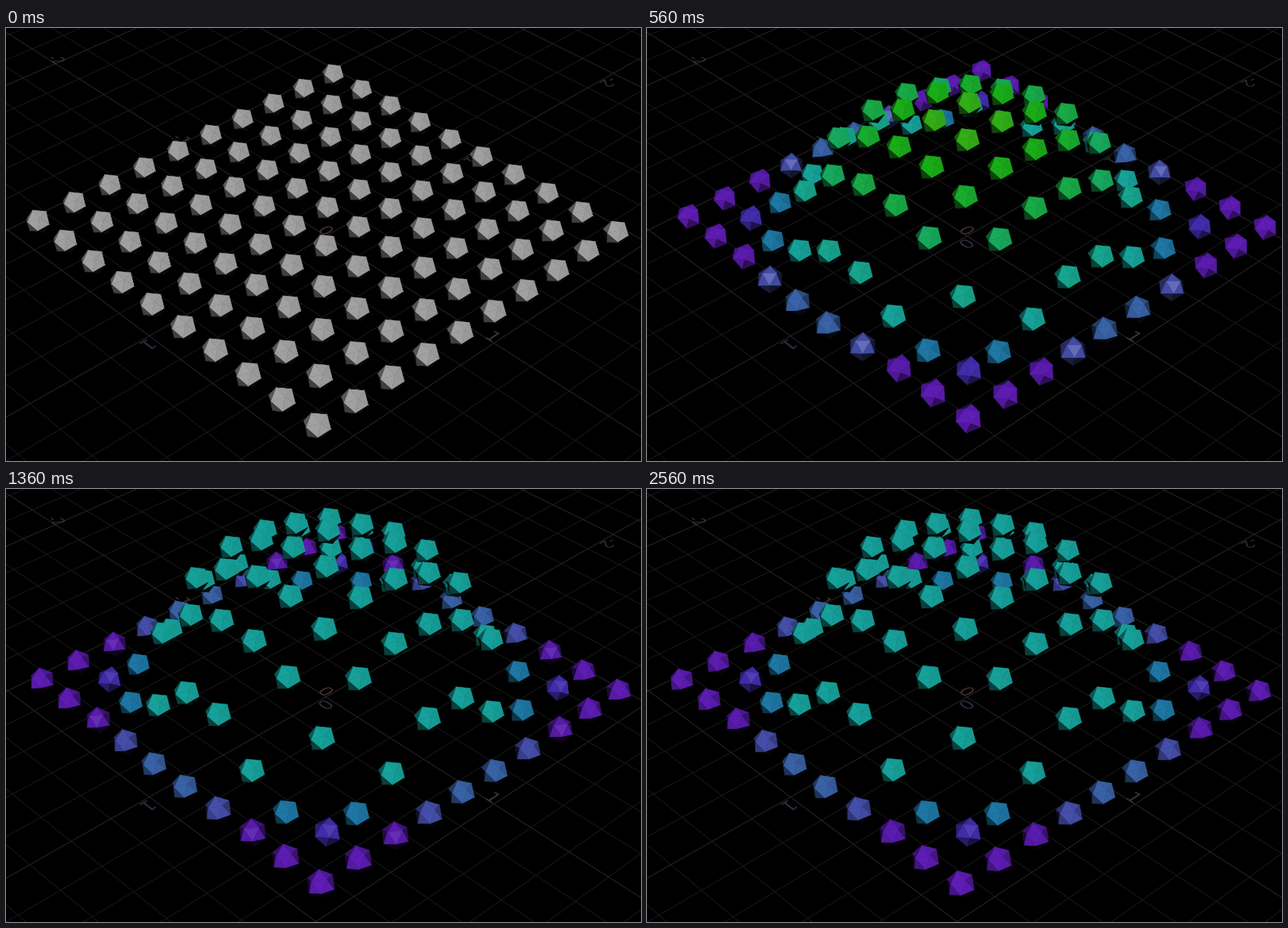
Recreate the animation shown at these times as a matplotlib script. Size 800 by 545 pixels, loop 2.6 s.

```python
import numpy as np
import matplotlib.pyplot as plt
from matplotlib.animation import FuncAnimation
from matplotlib.collections import LineCollection, PolyCollection
from matplotlib.colors import hsv_to_rgb
from matplotlib.patches import PathPatch
from matplotlib.path import Path
from matplotlib.textpath import TextPath

W, H, DPI = 800, 545, 100
FRAMES, STEP = 65, 40
FOCAL = 2201
RADIUS = 0.058
FLOOR = -0.05


def unit(v):
    v = np.asarray(v, float)
    return v / np.linalg.norm(v, axis=-1, keepdims=True)


# Camera axes: x right, y down, z forward
BACK = unit([0.7264, -0.4131, 0.5491])      # world -z
RIGHT = np.array([0.6873, 0.4408, -0.5777])  # world +x
RIGHT = unit(RIGHT - BACK * (RIGHT @ BACK))
UP = -np.cross(BACK, RIGHT)
ORIGIN = np.array([0.0112, -0.0773, 7.7])


def to_camera(x, y, z):
    x, y, z = np.broadcast_arrays(x, y, z)
    return ORIGIN + x[..., None] * RIGHT - z[..., None] * BACK + y[..., None] * UP


def project(p):
    return np.array([W / 2, H / 2]) + FOCAL * p[..., :2] / p[..., 2:]


def ground(x, z):
    return project(to_camera(np.asarray(x, float), FLOOR, np.asarray(z, float)))


def icosahedron():
    pole = unit([0.22, -0.24, -0.95])
    e1 = unit(np.cross(pole, [0, 1, 0]))
    e1 *= np.sign(e1[0])
    e2 = np.cross(pole, e1)
    e2 *= -np.sign(e2[1])

    def ring(start, height):
        a = np.radians(start + 72 * np.arange(5))[:, None]
        return 2 / 5 ** 0.5 * (np.cos(a) * e1 + np.sin(a) * e2) + height * pole

    verts = np.vstack([pole, ring(48, 5 ** -0.5), ring(84, -5 ** -0.5), -pole])
    faces = []
    for k in range(5):
        n = (k + 1) % 5
        u, u2, d, d2 = 1 + k, 1 + n, 6 + k, 6 + n
        faces += [(0, u, u2), (u, u2, d), (d, d2, u2), (11, d, d2)]
    return verts, np.array(faces)


VERTS, FACES = icosahedron()
LIGHT = unit([-0.02, -0.25, -0.96])
ROLL_AXIS = np.cross(UP, BACK)

# 10 x 10 balls; those inside the dome's rim are lifted onto it
X, Z = [g.ravel() for g in np.meshgrid(np.linspace(-0.9, 0.9, 10),
                                       np.linspace(0.9, -0.9, 10))]
DIST = np.hypot(X, Z) / 0.2
LIFTED = DIST < 4
DOME = np.where(LIFTED, np.sqrt(np.maximum(0.602 - (0.2 * DIST) ** 2, 0)) - 0.047, 0)

# Balls near the rim settle more slowly
RIM = np.clip((DIST - 3) / 0.81, 0, 1)
SPAN = 0.9 + 1.1 * RIM ** 2
POWER = 1.5 + 1.5 * RIM ** 3

# Outer balls roll away and partly back
ROLL_SIZE = 0.055 * np.clip((DIST - 4.2) / 0.85, 0, 1)
ROLL_REST = 0.22 + 0.7 * np.exp(-((DIST - 4.95) / 0.15) ** 2)


def heights(t):
    left = np.clip(1 - t / SPAN, 0, 1)
    overshoot = 0.012 * np.exp(-((t - 1.05) / 0.25) ** 2) * (RIM < 0.5)
    speed = DOME * POWER / SPAN * left ** (POWER - 1)
    return DOME * (1 - left ** POWER + overshoot), speed


def rolls(t):
    peak = 0.56
    if t < peak:
        return ROLL_SIZE * t / peak
    return ROLL_SIZE * (ROLL_REST + (1 - ROLL_REST) * np.exp((peak - t) / 0.45))


def colours(speed):
    """Teal at rest on the dome, warmer with speed, bluer with distance."""
    outside = np.where(LIFTED, 0, DIST - 4)
    hue = np.clip(177 - 125 * speed ** 2 + 77 * outside, 15, 266)
    sat = 0.86 - 0.28 * np.exp(-((hue - 230) / 22) ** 2)
    value = 0.62 + 0.07 * np.minimum(speed + outside / 2, 1)
    return hsv_to_rgb(np.stack([hue / 360, sat, value], axis=1))


def rotated(angle):
    c, s = np.cos(angle)[:, None, None], np.sin(angle)[:, None, None]
    along = (VERTS @ ROLL_AXIS)[:, None] * ROLL_AXIS
    return VERTS * c + np.cross(ROLL_AXIS, VERTS) * s + along * (1 - c)


def scene(frame):
    t = frame * STEP / 1000
    height, speed = heights(t)
    shift = rolls(t)
    centre = to_camera(X, height, Z - shift)
    shape = rotated(shift / RADIUS)
    base = colours(speed) if frame else np.full((100, 3), 0.62)

    order = np.argsort(-centre[:, 2])
    centre, shape, base = centre[order], shape[order], base[order]

    corners = shape[:, FACES]
    normal = unit(corners.sum(axis=2))
    points = centre[:, None, None] + RADIUS * corners
    facing = np.sum(normal * points.mean(axis=2), axis=-1) < 0

    lit = np.clip(normal @ LIGHT, 0, 1)
    shade = np.clip((lit - 0.1) / 0.5, 0.08, 1) * (0.82 + 0.22 * lit)
    gloss = 0.2 * np.clip((lit - 0.975) / 0.025, 0, 1)[..., None]
    colour = base[:, None] * shade[..., None]
    colour = colour + (1 - colour) * gloss
    return project(points)[facing], colour[facing]


fig = plt.figure(figsize=(W / DPI, H / DPI), dpi=DPI, facecolor="black")
ax = fig.add_axes([0, 0, 1, 1])
ax.set_xlim(0, W)
ax.set_ylim(H, 0)
ax.axis("off")


def grid_lines(steps, colour):
    ends = np.array([-4.0, 4.0])
    lines = [ground(np.full(2, 0.2 * k), ends) for k in steps]
    lines += [ground(ends, np.full(2, 0.2 * k)) for k in steps]
    ax.add_collection(LineCollection(lines, colors=colour, linewidths=0.72, zorder=1))


def label(text, x, z, along_x):
    path = TextPath((0, 0), text, size=0.09)
    box = path.get_extents()
    u, v = (path.vertices - [(box.x0 + box.x1) / 2, (box.y0 + box.y1) / 2]).T
    if along_x:
        pts, colour = ground(x + u, z - v), "#402f2f"
    else:
        pts, colour = ground(x + v, z + u), "#2c2c3c"
    ax.add_patch(PathPatch(Path(pts, path.codes), fc=colour, lw=0, zorder=2))


grid_lines([k for k in range(-20, 21) if k % 5], "#181818")
grid_lines(range(-20, 21, 5), "#262626")
for n in range(-2, 3):
    label(str(n), n - 0.03, -0.03, True)
    label(str(n), 0.04, n + 0.04 * len(str(n)), False)

balls = PolyCollection([], edgecolors="face", linewidths=0.3, zorder=3)
ax.add_collection(balls)


def draw(frame):
    polys, fills = scene(frame)
    balls.set_verts(polys)
    balls.set_facecolor(fills)
    return (balls,)


anim = FuncAnimation(fig, draw, frames=FRAMES, interval=STEP, repeat=True, repeat_delay=0)
plt.show()
```
